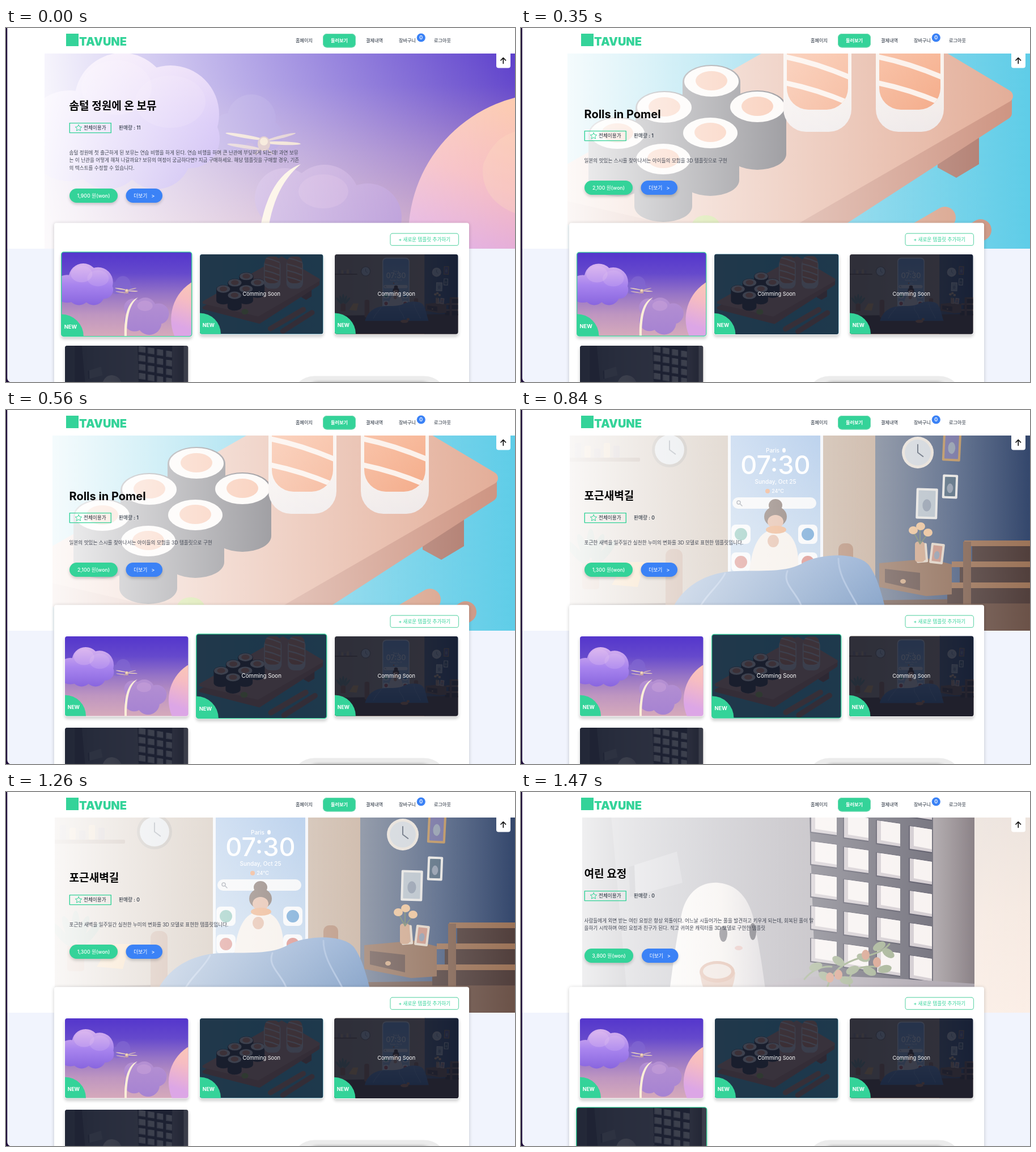
An HTML page with a canvas for the animation above (1680 ms loop, 898 by 624 pixels).

```html
<!DOCTYPE html>
<html lang="ko">
<head>
<meta charset="utf-8">
<title>Template shop</title>
<style>
html, body { margin: 0; width: 100%; height: 100%; overflow: hidden; background: #fff; }
canvas { display: block; width: 898px; height: 624px; }
</style>
</head>
<body>
<canvas id="stage" width="898" height="624"></canvas>
<script>
const ctx = document.getElementById('stage').getContext('2d');
const GREEN = '#34d399', PALE_GREEN = '#6fd8b0', BLUE = '#3b82f6', INK = '#1f2937';
const FONT = 'Inter, "Noto Sans CJK KR", "Noto Sans CJK", sans-serif';
const LOOP = 1680, STEP = 70;

// ---- drawing helpers
function ell(x, y, rx, ry, fill, rot = 0) {
  ctx.beginPath();
  ctx.ellipse(x, y, rx, ry, rot, 0, Math.PI * 2);
  ctx.fillStyle = fill;
  ctx.fill();
}
function box(x, y, w, h, r, fill) {
  ctx.beginPath();
  ctx.roundRect(x, y, w, h, r);
  ctx.fillStyle = fill;
  ctx.fill();
}
function outline(x, y, w, h, r, color, width) {
  ctx.beginPath();
  ctx.roundRect(x, y, w, h, r);
  ctx.strokeStyle = color;
  ctx.lineWidth = width;
  ctx.stroke();
}
function poly(fill, ...p) {
  ctx.beginPath();
  for (let i = 0; i < p.length; i += 2) ctx.lineTo(p[i], p[i + 1]);
  ctx.closePath();
  ctx.fillStyle = fill;
  ctx.fill();
}
function shape(fill, d) {
  ctx.fillStyle = fill;
  ctx.fill(new Path2D(d));
}
function line(color, width, d) {
  ctx.strokeStyle = color;
  ctx.lineWidth = width;
  ctx.lineCap = ctx.lineJoin = 'round';
  ctx.stroke(new Path2D(d));
}
function slab(color, d) {
  line(color, 22, d);
  shape(color, d);
}
function fade(x0, y0, x1, y1, ...colors) {
  const g = ctx.createLinearGradient(x0, y0, x1, y1);
  colors.forEach((c, i) => g.addColorStop(i / (colors.length - 1), c));
  return g;
}
function text(s, x, y, size, color, weight = 400, align = 'left') {
  ctx.font = `${weight} ${size}px ${FONT}`;
  ctx.textAlign = align;
  ctx.textBaseline = 'middle';
  ctx.fillStyle = color;
  ctx.fillText(s, x, y);
}
function shadow(color, blur = 0, dy = 0) {
  ctx.shadowColor = color;
  ctx.shadowBlur = blur;
  ctx.shadowOffsetY = dy;
}
const noShadow = () => shadow('transparent');

// ---- pictures, in banner coordinates
function puff(fill, ...circles) {
  ctx.beginPath();
  for (let i = 0; i < circles.length; i += 3) {
    const [x, y, r] = circles.slice(i, i + 3);
    ctx.moveTo(x + r, y);
    ctx.arc(x, y, r, 0, Math.PI * 2);
  }
  ctx.fillStyle = fill;
  ctx.fill();
}
function clouds() {
  ctx.fillStyle = fade(0, -20, 0, 460, '#5436cc', '#6549cc', '#9674c6', '#bf96c0', '#d5a9bb');
  ctx.fillRect(-100, -100, 1100, 650);
  puff('#8268d2aa', 433, 160, 43, 395, 185, 35, 460, 190, 28);
  puff(fade(0, 45, 0, 290, '#d9b4ee', '#a884ee', '#8764de'),
    205, 128, 84, 112, 190, 80, 290, 152, 86, 180, 222, 62, 265, 222, 62, 325, 195, 52);
  ell(195, 105, 62, 48, '#e7c8f044');
  ell(290, 130, 62, 46, '#e7c8f033');
  puff(fade(0, 240, 0, 450, '#b590d2', '#a683d2'),
    492, 300, 53, 562, 303, 62, 638, 334, 60, 500, 375, 60, 585, 385, 70);
  ell(560, 288, 44, 30, '#cfa8dc66');
  shape('#fbeed8', 'M442 480C438 370 452 265 520 240C472 280 454 345 455 480Z');
  ell(960, 365, 250, 250, fade(900, 120, 800, 420, '#fdcdb0', '#f6bcc2', '#dca6e6'));
  shape('#fdd9bd55', 'M842 240C858 200 880 185 910 180L910 330C870 320 835 290 842 240Z');
  ell(421, 191, 34, 3, '#ead2bc', .17);
  ell(487, 203, 33, 3, '#ead2bc', .04);
  ell(420, 209, 30, 3, '#d3b6b8', .15);
  ell(485, 192, 27, 2.5, '#d3b6b8', -.25);
  ell(455, 204, 11, 13, '#c8a4a4');
  ell(455, 200, 7, 7, '#f0d8bc');
  line('#b08ea8', 3, 'M448 214L440 222M462 214L470 222');
}

function roll(x, y) {
  shape('#46454d', `M${x - 51} ${y}V${y + 82}A51 28 0 0 0 ${x + 51} ${y + 82}V${y}Z`);
  ell(x, y, 51, 30, '#46454d');
  ell(x, y - 1, 48, 27, '#fbf6f2');
  ell(x, y - 2, 28, 17, '#f4a884');
}
function nigiri(x) {
  box(x - 60, -30, 120, 213, 40, fade(0, 80, 0, 183, '#f8f0ea', '#ebe4e4'));
  ctx.save();
  ctx.beginPath();
  ctx.roundRect(x - 54, -50, 108, 194, 38);
  ctx.clip();
  ctx.fillStyle = fade(0, 20, 0, 140, '#f7ad88', '#f29b72');
  ctx.fillRect(x - 60, -50, 120, 200);
  for (let y = -35; y < 130; y += 46)
    line('#fbeee6', 9, `M${x - 66} ${y - 8}Q${x} ${y + 4} ${x + 66} ${y + 34}`);
  ctx.restore();
}
function sushi() {
  ctx.fillStyle = fade(0, 0, 898, 0, '#6fcbe2', '#58c6e3', '#5fcde8');
  ctx.fillRect(-50, -100, 1050, 680);
  poly('#ad7668', 735, 215, 808, 175, 808, 240, 768, 264, 735, 246);
  slab('#cc917e', 'M30 322L430 425L855 150V120L590 -20Z');
  slab('#e2ab95', 'M30 282L420 372L857 120L592 -38Z');
  for (let j = 0; j < 3; j++)
    for (let i = 0; i < 2; i++) roll(336 - 83 * j + 81 * i, 95 + 46 * j + 45 * i);
  nigiri(523);
  nigiri(686);
  ell(326, 350, 25, 20, '#b5cf5e');
  line('#d69d84', 38, 'M510 472L748 334');
  line('#cb927e', 38, 'M600 490L811 356');
}

function frame(x, y, w, h, rot, edge, fill) {
  ctx.save();
  ctx.translate(x, y);
  ctx.rotate(rot);
  box(-w / 2, -h / 2, w, h, 2, edge);
  box(-w / 2 + 4, -h / 2 + 4, w - 8, h - 8, 1, fill);
  ell(0, 3, w / 5, h / 5, '#8c97a8');
  ctx.restore();
}
function clock(x, y, r, rim) {
  ell(x, y, r, r, rim);
  ell(x, y, r - 5, r - 5, '#cdd2d8');
  line('#566070', 2, `M${x} ${y - r / 2}V${y}L${x + r / 3} ${y + r / 4}`);
}
function morning() {
  ctx.fillStyle = fade(70, 0, 625, 0, '#b39a86', '#b9a592', '#bda28d');
  ctx.fillRect(-50, -100, 680, 650);
  ctx.fillStyle = fade(625, 0, 898, 0, '#667186', '#4d5f80', '#34476c');
  ctx.fillRect(625, -100, 400, 650);
  poly('#6b5248', -50, 345, 1000, 330, 1000, 560, -50, 560);
  clock(262, 70, 31, '#8d8074');
  box(70, 84, 140, 7, 2, '#8a6a55');
  for (let i = 0; i < 5; i++) box(95 + i * 17, 58 + i % 3 * 5, 11, 26 - i % 3 * 5, 2, i % 2 ? '#d9b283' : '#a08b8b');
  // phone
  box(365, -15, 168, 340, 24, '#eef2f8');
  box(370, -9, 158, 328, 20, fade(0, 0, 0, 300, '#86aee0', '#b9cfe6'));
  text('Paris', 444, 72, 10, '#fff', 500, 'center');
  ell(464, 71, 3, 4, '#fff');
  text('07:30', 449, 99, 45, '#fff', 500, 'center');
  text('Sunday, Oct 25', 449, 127, 10, '#fff', 500, 'center');
  ell(435, 143, 4, 4, '#e88a52');
  text('24°C', 453, 143, 9, '#fff', 500, 'center');
  box(373, 154, 148, 20, 10, '#f1f2f4');
  line('#6b7280', 1.5, 'M387 166L390 169M381 163A3 3 0 1 0 387 163A3 3 0 1 0 381 163');
  for (const [x, y, c] of [[388, 219, '#5fae9f'], [506, 219, '#3f86c6'], [388, 268, '#cc665d'], [506, 268, '#cc665d']]) {
    box(x - 17, y - 17, 34, 34, 8, '#f4f5f7');
    ell(x, y, 11, 11, c);
  }
  // sleeper, bed and bedside
  ell(449, 168, 12, 11, '#594238');
  ell(449, 188, 20, 18, '#594238');
  ell(449, 197, 14, 12, '#d9a184');
  shape('#f2e9e1', 'M402 295C406 240 420 212 449 210C480 212 494 240 488 295Z');
  ell(450, 211, 18, 7, '#e4935c');
  ell(445, 231, 10, 11, '#d9a184');
  box(560, 235, 26, 85, 10, '#a47459');
  box(255, 245, 30, 110, 12, '#a47459');
  shape(fade(0, 245, 0, 370, '#7b9cca', '#557db0'),
    'M258 375C275 310 330 285 380 284C420 282 470 288 500 268C540 250 600 253 615 275C635 305 640 345 650 375Z');
  line('#90acd4', 3, 'M360 288C350 310 320 330 310 360M470 284C460 310 490 320 500 360M560 262C560 300 590 330 600 360');
  poly('#edb36a', 185, 268, 218, 268, 206, 312, 160, 308);
  box(108, 268, 30, 48, 5, '#b17a5a');
  for (let i = 0; i < 5; i++) ell(123 + (i - 2) * 13, 235 + Math.abs(i - 2) * 8, 7, 26, '#7d9480', (i - 2) * .35);
  ell(501, 378, 24, 10, '#d08a58');
  ell(524, 366, 9, 8, '#d08a58');
  // right wall
  clock(700, 75, 28, '#e5ddd4');
  frame(760, 64, 32, 52, .05, '#b78d58', '#6c6a9c');
  frame(757, 135, 27, 42, .04, '#e4e2df', '#51677b');
  frame(716, 165, 38, 54, .03, '#e4e2df', '#b3bdc6');
  for (let i = 0; i < 3; i++) {
    const x = 782 - i * 22, y = 230 + i * 37;
    poly('#9b7358', x, y, 920, y, 920, y + 10, x, y + 10);
    poly('#513f3c', x + 14, y + 10, 920, y + 10, 920, y + 37, x + 14, y + 37);
  }
  poly('#806150', 780, 232, 794, 232, 794, 343, 780, 343);
  poly('#8d6a55', 632, 270, 720, 262, 760, 272, 760, 325, 715, 328, 632, 312);
  poly('#604a44', 642, 280, 704, 287, 704, 318, 642, 304);
  ell(674, 302, 5, 4, '#c9a07c');
  frame(707, 252, 20, 34, -.08, '#ddd0c2', '#c4a18c');
  frame(734, 253, 24, 36, .12, '#ddd0c2', '#c48f80');
  box(695, 232, 17, 36, 5, '#caa084');
  line('#6f8068', 2, 'M704 236L692 214M704 236L704 208M704 236L718 218');
  for (const [x, y] of [[692, 212], [705, 205], [718, 216]]) ell(x, y, 8, 7, '#e8bd92');
}

function ghost() {
  ctx.fillStyle = fade(60, 0, 520, 0, '#767680', '#93929c', '#a6a1a8');
  ctx.fillRect(0, -60, 1000, 700);
  poly('#aaa9b2', 190, 132, 275, 105, 285, 160, 192, 185);
  poly('#6a6a76', 190, 132, 200, 129, 202, 183, 192, 185);
  poly('#62616c', 108, -60, 150, -60, 190, 389, 108, 389);
  poly('#595764', 505, -60, 730, -60, 730, 400, 560, 400, 518, 300);
  ctx.fillStyle = fade(727, 0, 800, 0, '#a29b9f', '#90878b', '#7c7278');
  ctx.fillRect(727, -60, 73, 470);
  ctx.fillStyle = fade(800, 45, 898, 389, '#ece3dd', '#f6eae2', '#fbeee6');
  ctx.fillRect(800, -60, 200, 500);
  for (let c = 0; c < 4; c++)
    for (let r = -1; r < 5; r++) {
      const x = 512 + c * 58, y = 30 + r * 57 + c * 10, w = 45 - c * 2;
      poly('#3d3b4c', x - 2, y - 1, x + w, y + 5, x + w, y + 48, x - 2, y + 42);
      poly('#cbc3c8', x, y, x + w, y + 6, x + w, y + 46, x, y + 40);
      poly('#f6f0ee', x + 7, y + 1, x + w, y + 6, x + w, y + 41, x + 7, y + 35);
    }
  shape('#a39ba5', 'M430 343C490 318 560 322 800 338V400H430Z');
  shape(fade(270, 0, 435, 0, '#f6f1ed', '#efe8e3', '#c4bfc5'),
    'M256 400C266 320 274 255 284 212C294 172 322 158 348 160C388 164 406 195 414 240C422 285 430 330 437 400Z');
  ell(409, 246, 6, 15, '#25232e');
  ell(357, 250, 7, 14, '#25232e');
  ell(384, 275, 7, 4, '#d9a29a');
  shape('#d3a48e', 'M316 318C318 345 328 365 346 365C366 365 376 345 378 318Z');
  ell(346, 317, 31, 19, '#cc8d71');
  ell(346, 316, 25, 13, '#e3d0c6');
  line('#8a9c74', 3, 'M540 345C548 315 570 300 600 292S640 280 650 268M580 343C575 320 590 305 628 308M500 330Q520 306 548 308');
  for (const [x, y, a] of [[560, 298, .6], [585, 314, -.4], [604, 292, .3], [632, 272, -.5], [648, 284, .6],
    [520, 308, -.3], [536, 325, .5], [615, 316, .4], [642, 312, -.2], [574, 332, .2]])
    ell(x, y, 12, 7, '#93a37f', a);
  for (const [x, y] of [[545, 327], [608, 287], [560, 322], [628, 300]]) ell(x, y, 7, 9, '#cf8d74');
}

// card point (cx, cy) shows banner point (bx, by), reduced k times
const scenes = [
  { draw: clouds, edge: 68, cx: 213, cy: 464, bx: 455, by: 203, k: 3.45, title: '솜털 정원에 온 보뮤', sold: 11, price: '1,900',
    body: ['솜털 정원에 첫 출근하게 된 보뮤는 연습 비행을 하게 된다. 연습 비행을 하며 큰 난관에 부딪히게 되는데! 과연 보뮤',
      '는 이 난관을 어떻게 해쳐 나갈까요? 보뮤의 여정이 궁금하다면? 지금 구매하세요. 해당 템플릿을 구매할 경우, 기존',
      '의 텍스트를 수정할 수 있습니다.'] },
  { draw: sushi, edge: 82, cx: 424, cy: 438, bx: 336, by: 95, k: 4.1, title: 'Rolls in Pomel', sold: 1, price: '2,100',
    body: ['일본의 맛있는 스시를 찾아나서는 아이들의 모험을 3D 템플릿으로 구현'] },
  { draw: morning, edge: 86, cx: 688, cy: 437, bx: 449, by: 98, k: 3.5, title: '포근새벽길', sold: 0, price: '1,300',
    body: ['포근한 새벽을 일주일간 실천한 누미의 변화를 3D 모델로 표현한 템플릿입니다.'] },
  { draw: ghost, edge: 108, cx: 188, cy: 613, bx: 348, by: 163, k: 3.6, title: '여린 요정', sold: 0, price: '3,800', shift: 1.5,
    body: ['사람들에게 외면 받는 여린 요정은 항상 외톨이다. 어느날 시들어가는 풀을 발견하고 키우게 되는데, 회복된 풀이 말',
      '을하기 시작하며 여린 요정과 친구가 된다. 작고 귀여운 캐릭터를 3D 모델로 구현한 템플릿'] },
];
const cards = [
  { x: 104, y: 399, from: -LOOP, to: 350 },
  { x: 342, y: 399, from: 350, to: 840 },
  { x: 580, y: 399, from: 840, to: 1190 },
  { x: 104, y: 560, from: 1330, to: LOOP },
];

// ---- page parts
function header() {
  ctx.fillStyle = '#fff';
  ctx.fillRect(0, 0, 898, 45);
  box(106, 10, 22, 22, 0, GREEN);
  ctx.textBaseline = 'alphabetic';
  ctx.font = `900 20px ${FONT}`;
  ctx.textAlign = 'left';
  ctx.fillStyle = GREEN;
  ctx.fillText('TAVUNE', 129, 31);
  box(559, 10, 58, 24.5, 7, GREEN);
  outline(559.5, 10.5, 57, 23.5, 7, PALE_GREEN, 1);
  const items = [['홈페이지', 526], ['둘러보기', 588], ['결제내역', 650], ['장바구니', 708], ['로그아웃', 770]];
  for (const [s, x] of items) {
    const on = x === 588;
    text(s, x, 22.5, 8.2, on ? '#fff' : INK, on ? 700 : 500, 'center');
  }
  ell(732.3, 17, 7.6, 7.6, BLUE);
  text('0', 732.3, 17.5, 9, '#fff', 600, 'center');
}

function pill(x, y, w, color, label) {
  shadow('rgba(0,0,0,.18)', 5, 3);
  box(x, y - 12.5, w, 25, 12.5, color);
  noShadow();
  text(label, x + w / 2, y + .5, 8.8, '#fff', 500, 'center');
}
function star(x, y, r) {
  ctx.beginPath();
  for (let i = 0; i < 10; i++) {
    const a = -Math.PI / 2 + i * Math.PI / 5, q = i % 2 ? r * .48 : r;
    ctx.lineTo(x + q * Math.cos(a), y + q * Math.sin(a));
  }
  ctx.closePath();
  ctx.strokeStyle = GREEN;
  ctx.lineWidth = 1;
  ctx.stroke();
}
function banner(s) {
  ctx.save();
  ctx.beginPath();
  ctx.rect(s.edge, 45, 898 - s.edge, 344);
  ctx.clip();
  s.draw();
  ctx.fillStyle = fade(20, 0, 898, 0, 'rgba(255,255,255,1)', 'rgba(255,255,255,0)');
  ctx.fillRect(0, 45, 898, 344);
  ctx.restore();

  const d = 7 * (s.body.length - 1), dx = s.shift || 0;
  text(s.title, 111.5, 152.5 - d, /[a-z]/.test(s.title) ? 20 : 19.1, '#050505', 700);
  outline(112.3, 181.6 - d, 73, 17, 0, GREEN, 1.4);
  star(128, 190.3 - d, 6);
  text('전체이용가', 137, 190.5 - d, 8.6, INK, 500);
  text('판매량 : ' + s.sold, 199, 190.5 - d, 8.7, INK, 500);
  s.body.forEach((row, i) => text(row, 111.5, 234 - d + 13.8 * i, 8.6, '#414653'));
  pill(112, 281.5 + d, 85 + dx * .7, GREEN, s.price + ' 원(won)');
  pill(211.5 + dx, 281.5 + d, 64.5, BLUE, '더보기   >');
}

function panel() {
  shadow('rgba(0,0,0,.2)', 6, 1);
  box(85, 343.5, 732, 320, 4, '#fff');
  noShadow();
  outline(678, 362.2, 120.5, 21.2, 4, PALE_GREEN, 1.2);
  text('+ 새로운 템플릿 추가하기', 738.3, 373.3, 8.6, GREEN, 500, 'center');
  box(504, 613.5, 274, 80, 40, '#ececec');
  shadow('rgba(0,0,0,.3)', 5);
  box(530, 624, 224, 40, 20, '#d8d8d8');
  noShadow();
}

function card(c, i, p) {
  const w = 217.5, h = 140.5, { x, y } = c, s = scenes[i], z = 1 + .058 * p;
  ctx.save();
  ctx.translate(x + w / 2, y + h / 2);
  ctx.scale(z, z);
  ctx.translate(-x - w / 2, -y - h / 2);
  shadow('rgba(0,0,0,.18)', 5, 4);
  box(x - 1, y - 1, w + 2, h + 2, 5, '#fff');
  noShadow();

  ctx.save();
  ctx.beginPath();
  ctx.roundRect(x, y, w, h, 4);
  ctx.clip();
  ctx.save();
  ctx.translate(s.cx, s.cy);
  ctx.scale(1 / s.k, 1 / s.k);
  ctx.translate(-s.bx, -s.by);
  s.draw();
  ctx.restore();
  if (i) {
    ctx.fillStyle = 'rgba(14,20,38,.8)';
    ctx.fillRect(x, y, w, h);
    text('Comming Soon', x + w / 2, y + 70.3, 9.2, '#fff', 400, 'center');
  }
  ell(x, y + h, 37, 37, GREEN);
  text('NEW', x + 15.3, y + 125, 8.8, '#fff', 700, 'center');
  ctx.restore();

  if (p > .5) {
    ctx.globalAlpha = p;
    outline(x, y, w, h, 4, GREEN, 1.3);
  }
  ctx.restore();
}

function toTop() {
  box(865, 45, 25, 25.5, [0, 0, 4, 4], '#fff');
  line('#111', 1.7, 'M877.3 62.5V53M873 57L877.3 52.6L881.6 57');
}
function leftEdge() {
  shape('#1d0c38', 'M0 0H2.2V617Q2.2 622 7 624H0Z');
}

// ---- timeline
const ramp = d => d < 0 ? 0 : d < STEP ? .15 : d < 2 * STEP ? .85 : 1;

function paint(t) {
  const active = t < 350 ? 0 : t < 840 ? 1 : t < 1330 ? 2 : 3;
  ctx.fillStyle = '#fff';
  ctx.fillRect(0, 0, 898, 389);
  ctx.fillStyle = '#f1f4fd';
  ctx.fillRect(0, 389, 898, 235);
  banner(scenes[active]);
  header();
  panel();
  cards.forEach((c, i) => card(c, i, ramp(t - c.from) * (1 - ramp(t - c.to))));
  toTop();
  leftEdge();
}

const start = performance.now();
let shown = -1;
function tick() {
  const step = Math.floor((performance.now() - start) % LOOP / STEP);
  if (step !== shown) paint((shown = step) * STEP);
  requestAnimationFrame(tick);
}
tick();
</script>
</body>
</html>
```
